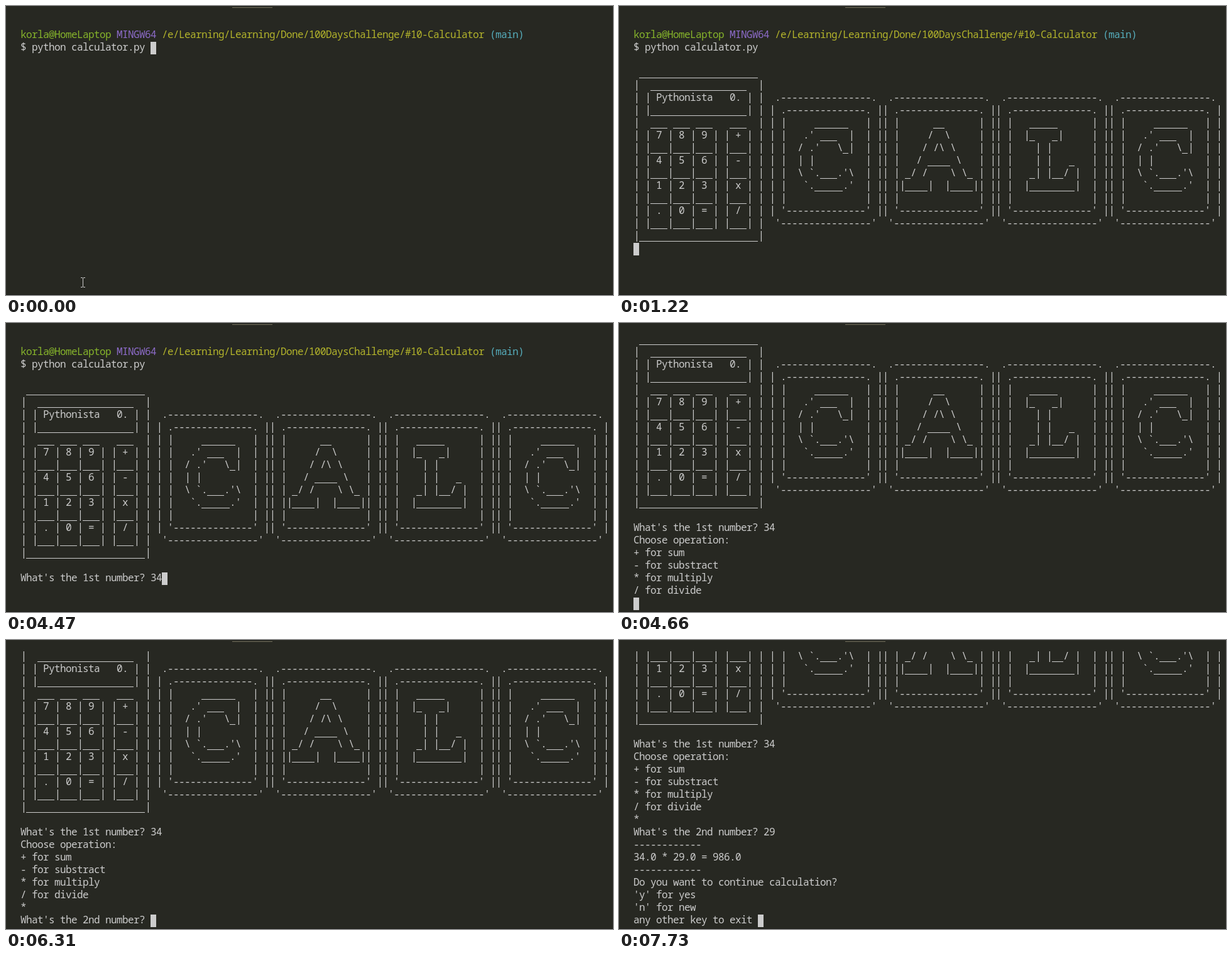
Write an HTML page with a canvas that moves like this. It is 966 px wide and 460 px high and loops after 8 s.

```html
<!DOCTYPE html>
<html lang="en">
<head>
<meta charset="utf-8">
<title>Terminal calculator</title>
<style>
  html, body { margin: 0; width: 100%; height: 100%; overflow: hidden; background: #272822; }
  canvas { display: block; }
</style>
</head>
<body>
<canvas id="stage" width="966" height="460"></canvas>
<script>
const LOOP = 8000, ROWS = 22, LEFT = 23, TOP = 17, CELL_W = 9, CELL_H = 20;
const FG = "#cccccc";
const ctx = document.getElementById("stage").getContext("2d");

// Banner: a keypad followed by four framed letters
const C = [
  "     ______",
  "   .' ___  |",
  "  / .'   \\_|",
  "  | |",
  "  \\ `.___.'\\",
  "   `._____.'",
  ""];
const A = [
  "      __",
  "     /  \\",
  "    / /\\ \\",
  "   / ____ \\",
  " _/ /    \\ \\_",
  "|____|  |____|",
  ""];
const L = [
  "   _____",
  "  |_   _|",
  "    | |",
  "    | |   _",
  "   _| |__/ |",
  "  |________|",
  ""];

const tile = rows => {
  const outer = "-".repeat(16), inner = "-".repeat(14);
  return [
    ` .${outer}. `,
    `| .${inner}. |`,
    ...rows.map(row => `| |${row.padEnd(14)}| |`),
    `| '${inner}' |`,
    ` '${outer}' `];
};
const keys = ([a, b, c, d]) => [
  `| | ${a} | ${b} | ${c} | | ${d} | |`,
  "| |___|___|___| |___| |"];
const keypad = [
  " " + "_".repeat(21),
  `|  ${"_".repeat(17)}  |`,
  "| | Pythonista   0. | |",
  `| |${"_".repeat(17)}| |`,
  "|  ___ ___ ___   ___  |",
  ...["789+", "456-", "123x", ".0=/"].flatMap(keys),
  `|${"_".repeat(21)}|`];
const tiles = [C, A, L, C].map(tile);
const banner = keypad
  .map((row, i) => row + " " + tiles.map(t => t[i - 2] || "").join(""))
  .join("\n");

// What appears in the terminal, and when; \x08 deletes one character
const rule = "-".repeat(12);
const output = [
  [0, "\nkorla@HomeLaptop MINGW64 /e/Learning/Learning/Done/100DaysChallenge/#10-Calculator (main)\n$ python calculator.py "],
  [1220, `\n\n${banner}\n`],
  [1420, "\nWhat's the 1st number? "],
  [2850, "3"],
  [3050, "4"],
  [3660, "5"],
  [4470, "\x08"],
  [4660, "\nChoose operation:\n+ for sum\n- for substract\n* for multiply\n/ for divide\n"],
  [5700, "*"],
  [6310, "\nWhat's the 2nd number? "],
  [6920, "2"],
  [7310, "9"],
  [7730, `\n${rule}\n34.0 * 29.0 = 986.0\n${rule}\nDo you want to continue calculation?\n'y' for yes\n'n' for new\nany other key to exit `]];

// Prompt colours by starting column
const PROMPT_LINE = 1;
const promptColors = [[83, "#56adbc"], [25, "#b3b42b"], [17, "#8c6bc8"], [0, "#86b42b"]];

function rect(color, x, y, w, h) {
  ctx.fillStyle = color;
  ctx.fillRect(x, y, w, h);
}

function drawChar(ch, x, y, color) {
  if (ch === "|") rect(color, x + 4.8, y + 1, 1.2, 17);
  else if (ch === "_") rect(color, x, y + 17, CELL_W, 1);
  else if (ch !== " ") {
    ctx.fillStyle = color;
    ctx.fillText(ch, x, y + 14);
  }
}

function drawPointer(x, y) {
  rect(FG, x + 3, y + 1, 1, 14);
  for (const edge of [y, y + 15]) {
    rect(FG, x, edge, 3, 1);
    rect(FG, x + 4, edge, 3, 1);
  }
}

function draw(t) {
  rect("#272822", 0, 0, 966, 460);
  rect("#75715e", 360, 2, 64, 1);
  rect("#1e1f1c", 0, 459, 966, 1);

  const lines = output.filter(([at]) => at <= t).map(([, text]) => text)
    .join("").replace(/.\x08/g, "").split("\n");
  const scroll = Math.max(0, lines.length - ROWS);
  const rowY = line => TOP + (line - scroll) * CELL_H;

  // Glyphs are slightly wider than the cell grid they sit on
  ctx.font = "500 16px 'Noto Sans Mono', 'DejaVu Sans Mono', monospace";
  for (let n = scroll; n < lines.length; n++) {
    [...lines[n]].forEach((ch, col) => {
      const color = n === PROMPT_LINE ? promptColors.find(([from]) => col >= from)[1] : FG;
      drawChar(ch, LEFT + col * CELL_W, rowY(n), color);
    });
  }

  const last = lines.length - 1;
  rect(FG, LEFT + lines[last].length * CELL_W, rowY(last), CELL_W, CELL_H);

  if (t < 200) drawPointer(119, 432);
  else if (t < 430) drawPointer(122, 431);
}

const start = performance.now();
function tick() {
  draw((performance.now() - start) % LOOP);
  requestAnimationFrame(tick);
}
tick();
</script>
</body>
</html>
```
